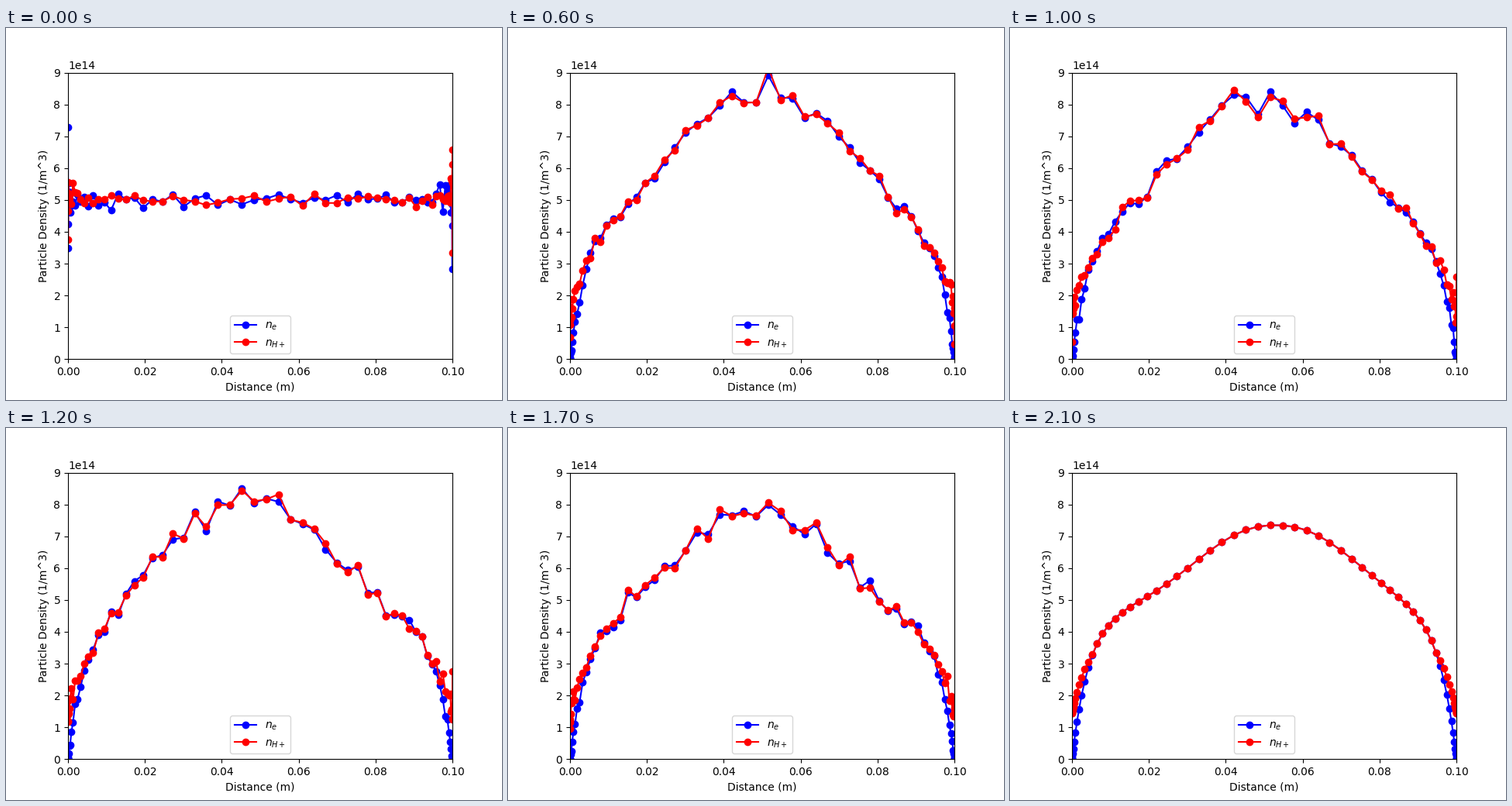
A matplotlib script that plays this animation: 640x480 px, repeating every 2200 ms.

```python
import numpy as np
import matplotlib.pyplot as plt
from matplotlib.animation import FuncAnimation

FRAMES, STEP = 22, 100
N, LENGTH = 64, 0.1
SCALE = 1e14
SHEATH = 0.0045

# Mesh clustered at both walls; cell width goes as sin^2
s = np.arange(N) / (N - 1)
x = LENGTH * (s - np.sin(2 * np.pi * s) / (2 * np.pi))
wall_gap = np.minimum(x, LENGTH - x)

# Fewer particles per cell near the walls, so more noise there
grain = 1 / np.maximum(np.sin(np.pi * s), 1 / 15)

# Moments of the run: time, floor, height, centre, width, flatness
MOMENTS = np.array([
    (0, 5.0, 0.0, 0.049, 0.027, 3.5),
    (4, 5.0, 3.5, 0.049, 0.027, 3.5),
    (8, 4.1, 4.0, 0.052, 0.028, 2.0),
    (12, 4.2, 4.1, 0.047, 0.028, 2.0),
    (15, 4.2, 3.5, 0.048, 0.027, 2.0),
    (17, 4.4, 3.3, 0.048, 0.027, 2.5),
    (21, 4.65, 2.7, 0.053, 0.027, 2.3),
]).T


def profile(k):
    """Smooth density: a bump on a floor, drained next to the walls."""
    floor, height, centre, width, power = (
        np.interp(k, MOMENTS[0], row) for row in MOMENTS[1:])
    bump = np.exp(-(np.abs(x - centre) / width) ** power)
    drain = min(1, k / 2) * np.exp(-wall_gap / SHEATH)
    return (floor + height * bump) * (1 - drain)


def densities(k):
    rng = np.random.default_rng(100 + k)
    shared, noise_e, noise_i = rng.normal(size=(3, N))
    live = k < FRAMES - 1
    rough = 0.17 if 0 < k and live else 0
    split = 0.03 if k else 0.13

    core = profile(k)
    core = np.maximum(core + rough * shared * np.sqrt(core / 5), 0)
    ions = core + 1.45 * np.maximum(0, 1 - core / 3.3)
    e = core + live * split * noise_e * grain * np.sqrt(core / 5)
    i = ions + live * 0.08 * noise_i * grain * np.sqrt(ions / 5)
    return np.maximum(e, 0) * SCALE, np.maximum(i, 0) * SCALE


fig, ax = plt.subplots(figsize=(6.4, 4.8), dpi=100)
line_e, = ax.plot([], [], "o-", color="blue", label=r"$n_e$")
line_i, = ax.plot([], [], "o-", color="red", label=r"$n_{H+}$")
ax.set(xlim=(0, LENGTH), ylim=(0, 9 * SCALE),
       xlabel="Distance (m)", ylabel="Particle Density (1/m^3)")
ax.legend(loc="lower center")


def update(k):
    for line, n in zip((line_e, line_i), densities(k)):
        line.set_data(x, n)
    return line_e, line_i


anim = FuncAnimation(fig, update, frames=FRAMES, interval=STEP,
                     init_func=lambda: update(0), repeat=True, repeat_delay=0)
plt.show()
```
